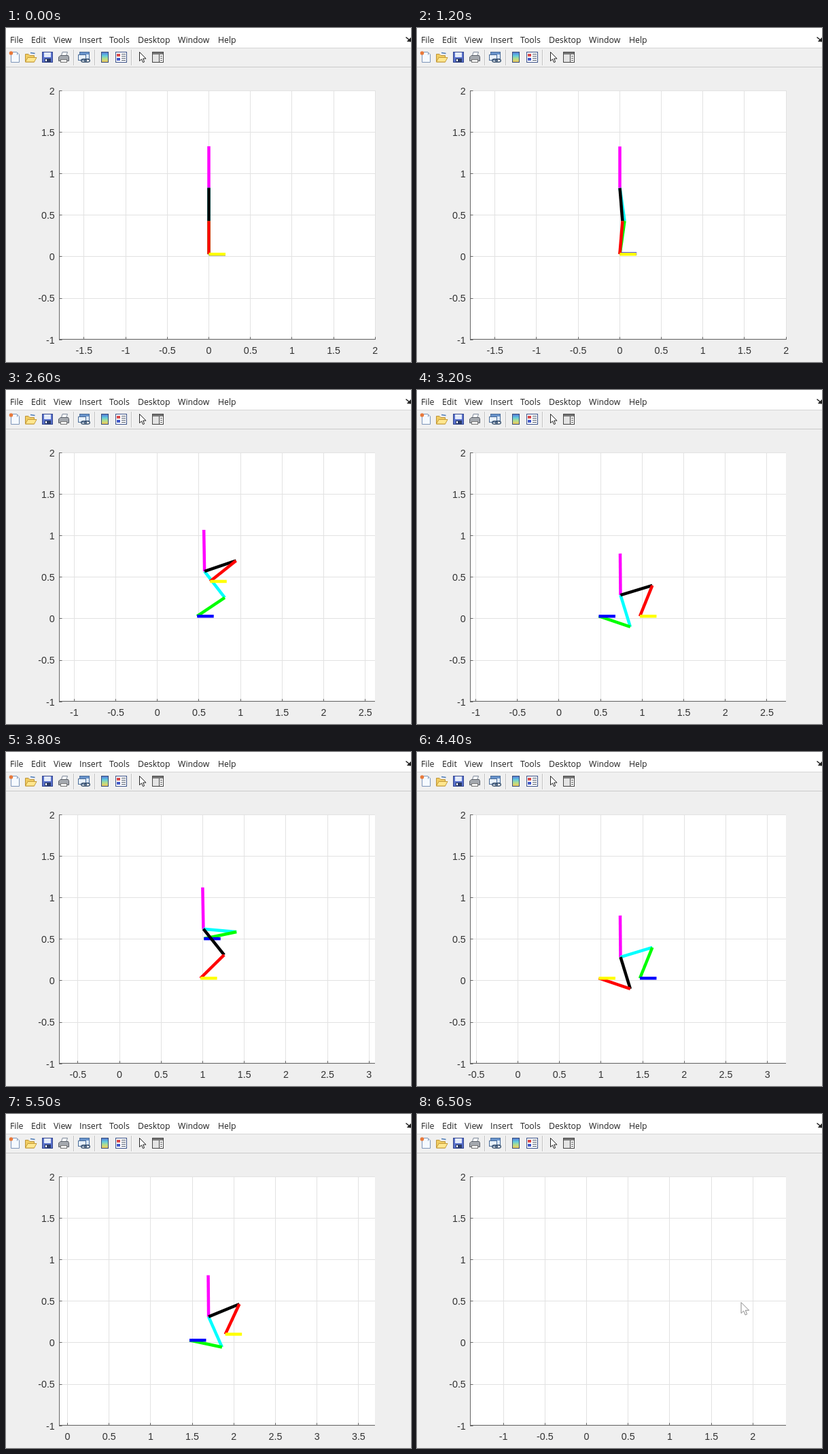
Write an HTML page with a canvas that moves like this. It is 596x492 px and loops after 6.6 s.

```html
<!DOCTYPE html>
<html lang="en">
<head>
<meta charset="utf-8">
<title>Walking robot plot</title>
<style>
  html, body { margin: 0; width: 596px; height: 492px; overflow: hidden; background: #efefef; }
  canvas { display: block; }
</style>
</head>
<body>
<canvas id="stage" width="596" height="492"></canvas>
<script>
const ctx = document.getElementById('stage').getContext('2d');
const LOOP = 6600, SCALE = 122.4;
const BOX = { left: 78, right: 543, top: 92, bottom: 459 };
const FIRST = { start: 1.17, length: 0.73, stride: 0.478 };
const STEP = { start: 1.9, length: 1.1, period: 1.3, stride: 0.4945, count: 3 };
const STAND = 0.83, CROUCH = 0.285, GROUND = 0.03, LINK = 0.4;

const clamp = u => Math.min(1, Math.max(0, u));
const smooth = u => u * u * (3 - 2 * u);
const bump = u => Math.sin(Math.PI * u) ** 2;
const mix = (a, b, u) => a + (b - a) * u;

// Both feet, hip and camera in plot units; t in seconds.
function pose(t) {
  if (t < STEP.start) {
    const u = clamp((t - FIRST.start) / FIRST.length), s = smooth(u);
    return {
      cam: 0.237 * s, hip: [0.245 * s, mix(STAND, CROUCH, s)], lean: -0.004 * s,
      yellow: [0, GROUND], blue: [FIRST.stride * s, GROUND + 0.33 * bump(u)]
    };
  }
  const n = Math.min(STEP.count - 1, Math.floor((t - STEP.start) / STEP.period + 1e-6));
  const u = clamp((t - STEP.start - n * STEP.period) / STEP.length);
  const lift = bump(u), s = mix(u, smooth(u), 0.4) - 0.012 * lift;
  const stance = FIRST.stride + n * STEP.stride;
  const from = n ? stance - STEP.stride : 0;
  const planted = [stance, GROUND];
  const swing = [mix(from, stance + STEP.stride, s), GROUND + 0.483 * lift ** 0.75];
  const yellowSwings = n % 2 === 0;
  return {
    cam: 0.237 + STEP.stride * (n + u + 0.59 * u * (1 - u)),
    hip: [0.245 + STEP.stride * (n + s), CROUCH + 0.345 * lift],
    lean: -0.004 - 0.005 * lift,
    yellow: yellowSwings ? swing : planted,
    blue: yellowSwings ? planted : swing
  };
}

function knee([hx, hy], [fx, fy]) {
  const dx = fx - hx, dy = fy - hy, d = Math.hypot(dx, dy);
  const h = Math.sqrt(Math.max(0, LINK * LINK - d * d / 4)) / d;
  return [hx + dx / 2 - dy * h, hy + dy / 2 + dx * h];
}

function line(x1, y1, x2, y2, color, width = 1) {
  ctx.strokeStyle = color;
  ctx.lineWidth = width;
  ctx.beginPath();
  ctx.moveTo(x1, y1);
  ctx.lineTo(x2, y2);
  ctx.stroke();
}

function rect(x, y, w, h, fill, stroke) {
  ctx.fillStyle = fill;
  ctx.fillRect(x, y, w, h);
  if (stroke) {
    ctx.strokeStyle = stroke;
    ctx.lineWidth = 1;
    ctx.strokeRect(x + 0.5, y + 0.5, w - 1, h - 1);
  }
}

function shape(points, fill, stroke) {
  ctx.beginPath();
  points.forEach(([x, y]) => ctx.lineTo(x, y));
  ctx.closePath();
  ctx.fillStyle = fill;
  ctx.fill();
  ctx.strokeStyle = stroke;
  ctx.lineWidth = 1;
  ctx.stroke();
}

function pointer(x, y, size, stroke) {
  const outline = [[0, 0], [0, 16], [3.7, 12.6], [6.2, 18.5], [8.7, 17.4], [6.3, 11.7], [11.6, 11.7]];
  shape(outline.map(([a, b]) => [x + a * size, y + b * size]), '#fff', stroke);
}

function drawToolbar() {
  rect(0, 0, 596, 29, '#fff');
  rect(0, 29, 596, 29, '#f0f0f0');
  line(0, 29.5, 596, 29.5, '#d4d4d4');
  line(0, 57.5, 596, 57.5, '#cacaca');

  ctx.font = '12.3px "Open Sans", "Noto Sans", sans-serif';
  ctx.fillStyle = '#222';
  ctx.textAlign = 'left';
  const menu = { File: 6, Edit: 37, View: 70, Insert: 108, Tools: 152, Desktop: 194, Window: 253, Help: 312 };
  for (const name in menu) ctx.fillText(name, menu[name], 21.5);
  line(588.5, 13.5, 594, 18, '#222', 1.6);
  shape([[596, 14.5], [596, 20], [590.5, 19.5]], '#222', '#222');

  for (const x of [99.5, 130.5, 184.5]) {
    line(x, 32, x, 55, '#c2c2c2');
    line(x + 1, 32, x + 1, 55, '#fafafa');
  }

  // new, open, save, print
  shape([[7.5, 35.5], [16, 35.5], [19.5, 39], [19.5, 50.5], [7.5, 50.5]], '#f5faff', '#7d95b8');
  line(16.5, 36, 16.5, 39.5, '#7d95b8');
  ctx.fillStyle = '#e8793a';
  ctx.beginPath();
  ctx.arc(7.5, 37, 2.8, 0, 7);
  ctx.fill();
  shape([[28.5, 50], [28.5, 38.5], [33, 38.5], [35, 40.5], [41.5, 40.5], [41.5, 50]], '#f0cc62', '#bd9336');
  shape([[28.5, 50], [32, 43.5], [45, 43.5], [41.5, 50]], '#ffe78f', '#c59a38');
  line(36, 36.5, 42.5, 37.5, '#4c7bb8', 1.5);
  rect(53, 35, 16, 16, '#5870ca', '#34468f');
  rect(56, 36, 10, 7, '#e4ebfb');
  rect(57, 45, 9, 5, '#2b3b66');
  rect(58, 46, 2, 3, '#fff');
  shape([[81.5, 41], [83, 35.5], [90.5, 35.5], [88.5, 41]], '#fff', '#7b8798');
  shape([[77.5, 43], [80, 40.5], [91.5, 40.5], [92.5, 43], [92.5, 48.5], [77.5, 48.5]], '#a5a9af', '#5b6068');
  rect(80, 46, 10, 5, '#f2f2f2', '#777');

  // linked windows
  rect(108, 35, 15, 11, '#dceafa', '#486b98');
  rect(109, 36, 13, 3, '#6893cb');
  rect(106, 39, 12, 9, '#e8f1fb', '#486b98');
  ctx.strokeStyle = '#38516f';
  ctx.lineWidth = 1.5;
  for (const x of [114.5, 119.5]) {
    ctx.beginPath();
    ctx.ellipse(x, 48, 3.8, 2.3, 0, 0, 7);
    ctx.stroke();
  }

  // colorbar and legend
  const bar = ctx.createLinearGradient(0, 36, 0, 50);
  ['#587bd6', '#60c9df', '#b2df8a', '#f2c75b'].forEach((c, i) => bar.addColorStop(i / 3, c));
  rect(140, 35, 11, 16, bar, '#344b77');
  rect(161, 35, 17, 16, '#fff', '#3c5289');
  rect(163, 38, 5, 4, '#d94848');
  rect(163, 44, 5, 4, '#4058c8');
  for (const y of [38.5, 41.5, 44.5, 47.5]) line(170, y, 176, y, '#4b5568');

  pointer(196.5, 35.5, 0.82, '#222');

  // property panel
  rect(215, 35, 17, 16, '#fff', '#444');
  rect(216, 36, 15, 3, '#777');
  line(225.5, 39, 225.5, 50, '#444');
  rect(216, 39, 9, 11, '#e4e4e4');
  for (const y of [41.5, 44.5, 47.5]) line(227, y, 230, y, '#555');
}

function drawAxes(cam) {
  const { left, right, top, bottom } = BOX, ink = '#333', axis = '#666', grid = '#e2e2e2';
  const px = x => 298.5 + (x - cam) * SCALE;
  const py = y => 336.9 - y * 122.33;
  rect(left, top, right - left, bottom - top, '#fff');
  ctx.font = '14.3px "Liberation Sans", Arial, sans-serif';
  const xTicks = [], yTicks = [];
  for (let v = -2; v <= 4; v += 0.5) {
    if (px(v) > left && px(v) < right + 1) xTicks.push(v);
    if (v >= -1 && v <= 2) yTicks.push(v);
  }
  for (const v of xTicks) {
    const x = Math.floor(px(v)) + 0.5;
    line(x, top, x, bottom, grid);
    line(x, bottom - 4, x, bottom, axis);
    ctx.fillStyle = ink;
    ctx.textAlign = 'center';
    ctx.fillText(v, px(v), 480);
  }
  for (const v of yTicks) {
    const y = Math.floor(py(v)) + 0.5;
    line(left, y, right, y, grid);
    line(left, y, left + 4.5, y, axis);
    ctx.fillStyle = ink;
    ctx.textAlign = 'right';
    ctx.fillText(v, 71.8, py(v) + 5.4);
  }
  line(left + 0.5, top, left + 0.5, bottom + 0.5, axis);
  line(left, bottom - 0.5, right, bottom - 0.5, axis);
  return { px, py };
}

function drawRobot(p, { px, py }) {
  const link = (a, b, color) => line(px(a[0]), py(a[1]), px(b[0]), py(b[1]), color, 4.5);
  const leg = (foot, thigh, shank, sole) => {
    const k = knee(p.hip, foot);
    link(p.hip, k, thigh);
    link(k, foot, shank);
    link(foot, [foot[0] + 0.2, foot[1]], sole);
  };
  link(p.hip, [p.hip[0] + p.lean, p.hip[1] + 0.5], '#f0f');
  leg(p.blue, '#0ff', '#0f0', '#00f');
  leg(p.yellow, '#000', '#f00', '#ff0');
}

function render(ms) {
  const t = Math.floor(ms % LOOP / 100) / 10;
  const cleared = t >= 6.4;
  const p = pose(t);
  rect(0, 0, 596, 492, '#efefef');
  drawToolbar();
  const axes = drawAxes(cleared ? 0.4 : p.cam);
  if (cleared) pointer(477, 277.5, 1, '#888');
  else drawRobot(p, axes);
}

const begin = performance.now();
function tick() {
  render(performance.now() - begin);
  requestAnimationFrame(tick);
}
tick();
</script>
</body>
</html>
```
